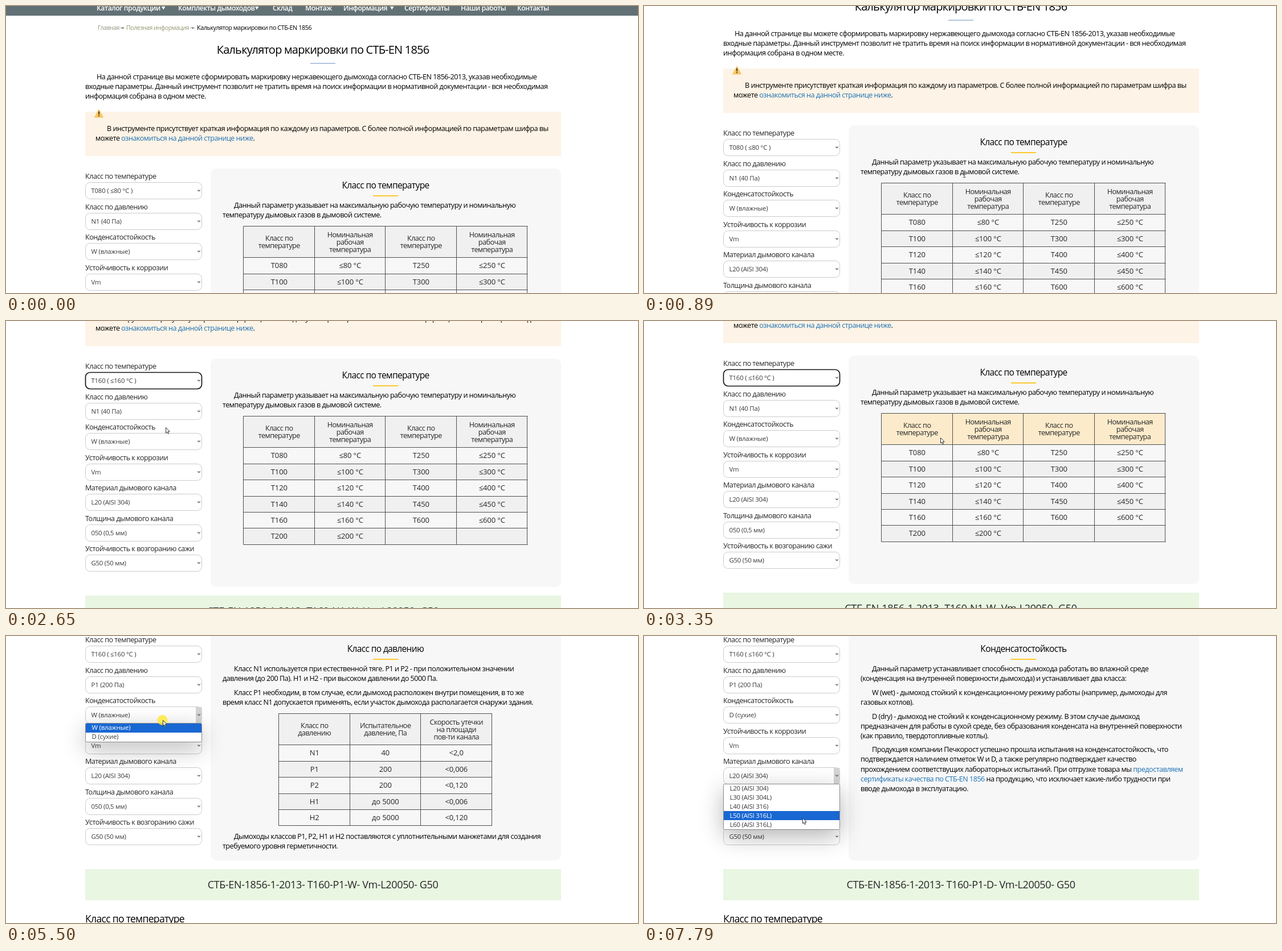
These frames come from a looping animation (1109x505 px, 7.99 s). An HTML page with a canvas:

```html
<!DOCTYPE html>
<html lang="ru">
<head>
<meta charset="utf-8">
<title>Калькулятор маркировки</title>
<style>
html, body { margin: 0; width: 100%; height: 100%; overflow: hidden; background: #fff; }
canvas { display: block; width: 1109px; height: 505px; }
</style>
</head>
<body>
<canvas id="stage"></canvas>
<script>
const W = 1109, H = 505, LOOP = 7990;
const canvas = document.getElementById('stage');
const ctx = canvas.getContext('2d');
const dpr = window.devicePixelRatio || 1;
canvas.width = W * dpr;
canvas.height = H * dpr;

const FONT = '"Open Sans", "Noto Sans", "DejaVu Sans", sans-serif';
const INK = '#000', SOFT = '#262626', LINK = '#1f72b4', YELLOW = '#fdc82f';

const clamp = v => Math.max(0, Math.min(1, v));
const easeInOut = p => p < 0.5 ? 4 * p ** 3 : 1 - 4 * (1 - p) ** 3;
const smooth = p => p * p * (3 - 2 * p);

// ---- timeline ----
const NOTCH = 73.2;
const NOTCHES = [[430, 200], [852, 180], [1030, 180], [3300, 190]];

// [time, x, y] of the pointer tip
const PATH = [
  [190, 640, 512], [540, 562, 296], [1090, 562, 296], [1230, 521, 258],
  [1500, 300, 130], [1620, 279, 103], [1830, 279, 103], [2050, 279, 187],
  [2640, 279, 187], [2860, 430, 198], [3070, 520, 205], [3450, 520, 205],
  [3900, 290, 92], [4030, 279, 85], [4080, 279, 85], [4180, 278, 122],
  [4800, 278, 122], [4900, 278, 133], [5300, 278, 133], [5450, 275, 148],
  [5510, 275, 148], [5640, 275, 173], [6640, 275, 173], [6980, 278, 239],
  [7180, 278, 239], [7700, 278, 320]
];

// Each use of a list: which one, when it opens, when an option is taken
const USES = [
  { box: 0, open: 1690, take: 2320, pick: 4 },
  { box: 1, open: 4030, take: 4350, pick: 1 },
  { box: 2, open: 5430, take: 5680, pick: 1 },
  { box: 4, open: 7120, take: Infinity, pick: 0 }
];

// [row, from, to]; row 0 is the table head
const HOVERS = [[3, 950, 1215], [2, 1150, 1340], [0, 2800, 3330], [2, 3400, 3560]];

// ---- content ----
const temps = [80, 100, 120, 140, 160, 200, 250, 300, 400, 450, 600];
const tName = n => 'T' + String(n).padStart(3, '0');
const tMax = n => `≤${n} °C`;

const BOXES = [
  ['Класс по температуре', temps.map(n => `${tName(n)} ( ${tMax(n)} )`)],
  ['Класс по давлению', ['N1 (40 Па)', 'P1 (200 Па)', 'P2 (200 Па)', 'H1 (200 и 5000 Па)', 'H2 (200 и 5000 Па)']],
  ['Конденсатостойкость', ['W (влажные)', 'D (сухие)']],
  ['Устойчивость к коррозии', ['Vm']],
  ['Материал дымового канала', ['L20 (AISI 304)', 'L30 (AISI 304L)', 'L40 (AISI 316)', 'L50 (AISI 316L)', 'L60 (AISI 316L)']],
  ['Толщина дымового канала', ['050 (0,5 мм)']],
  ['Устойчивость к возгоранию сажи', ['G50 (50 мм)']]
];

const NAV = [
  [159, 'Каталог продукции', 276], [302, 'Комплекты дымоходов', 440], [468, 'Склад'],
  [525, 'Монтаж'], [592, 'Информация', 677], [699, 'Сертификаты'],
  [798, 'Наши работы'], [897, 'Контакты']
];

const tempRows = [0, 1, 2, 3, 4, 5].map(i => {
  const cells = n => n ? [tName(n), tMax(n)] : ['', ''];
  return [...cells(temps[i]), ...cells(temps[i + 6])];
});
const T_HEAD = ['Класс по|температуре', 'Номинальная|рабочая|температура'];

const PANELS = [
  {
    title: 'Класс по температуре',
    paras: [[351, 'Данный параметр указывает на максимальную рабочую температуру и номинальную',
      'температуру дымовых газов в дымовой системе.']],
    table: { x: 417, y: 387.5, head: [...T_HEAD, ...T_HEAD], rows: tempRows }
  },
  {
    title: 'Класс по давлению',
    paras: [
      [351, 'Класс N1 используется при естественной тяге. P1 и P2 - при положительном значении',
        'давления (до 200 Па). H1 и H2 - при высоком давлении до 5000 Па.'],
      [393, 'Класс P1 необходим, в том случае, если дымоход расположен внутри помещения, в то же',
        'время класс N1 допускается применять, если участок дымохода располагается снаружи здания.'],
      [646, 'Дымоходы классов P1, P2, H1 и H2 поставляются с уплотнительными манжетами для создания',
        'требуемого уровня герметичности.']
    ],
    table: {
      x: 479, y: 429.5,
      head: ['Класс по|давлению', 'Испытательное|давление, Па', 'Скорость утечки|на площади|пов-ти канала'],
      rows: [['N1', '40', '<2,0'], ['P1', '200', '<0,006'], ['P2', '200', '<0,120'],
        ['H1', 'до 5000', '<0,006'], ['H2', 'до 5000', '<0,120']]
    }
  },
  {
    title: 'Конденсатостойкость',
    paras: [
      [351, 'Данный параметр устанавливает способность дымохода работать во влажной среде',
        '(конденсация на внутренней поверхности дымохода) и устанавливает два класса:'],
      [393, 'W (wet) - дымоход стойкий к конденсационному режиму работы (например, дымоходы для',
        'газовых котлов).'],
      [434.5, 'D (dry) - дымоход не стойкий к конденсационному режиму. В этом случае дымоход',
        'предназначен для работы в сухой среде, без образования конденсата на внутренней поверхности',
        '(как правило, твердотопливные котлы).'],
      [493, 'Продукция компании Печкорост успешно прошла испытания на конденсатостойкость, что',
        'подтверждается наличием отметок W и D, а также регулярно подтверждает качество',
        'прохождением соответствущих лабораторных испытаний. При отгрузке товара мы |предоставляем',
        '|сертификаты качества по СТБ-EN 1856| на продукцию, что исключает какие-либо трудности при',
        'вводе дымохода в эксплуатацию.']
    ]
  }
];

// ---- drawing helpers ----
function rect(x, y, w, h, color) {
  ctx.fillStyle = color;
  ctx.fillRect(x, y, w, h);
}

function roundRect(x, y, w, h, r, fill, stroke, line = 1) {
  ctx.beginPath();
  ctx.roundRect(x, y, w, h, r);
  if (fill) { ctx.fillStyle = fill; ctx.fill(); }
  if (stroke) { ctx.strokeStyle = stroke; ctx.lineWidth = line; ctx.stroke(); }
}

function poly(points, fill, stroke) {
  ctx.beginPath();
  points.forEach(([x, y]) => ctx.lineTo(x, y));
  ctx.closePath();
  ctx.fillStyle = fill;
  ctx.fill();
  if (stroke) { ctx.strokeStyle = stroke; ctx.lineWidth = 1; ctx.stroke(); }
}

// Text centred on y; parts between bars are links
function text(s, x, y, { size = 12.6, color = INK, align = 'left', track = -0.04, weight = 400 } = {}) {
  ctx.font = `${weight} ${size}px ${FONT}`;
  ctx.letterSpacing = `${track * size}px`;
  ctx.textAlign = align;
  s.split('|').forEach((part, i) => {
    ctx.fillStyle = i % 2 ? LINK : color;
    ctx.fillText(part, x, y + size * 0.345);
    x += ctx.measureText(part).width;
  });
}

function drawTable({ x, y, head, rows }, glow) {
  const colW = 124.5, headH = 55.3, rowH = 28.4;
  const w = colW * head.length, h = headH + rowH * rows.length;
  const top = i => i ? y + headH + (i - 1) * rowH : y;
  for (let i = 0; i <= rows.length; i++) {
    const rh = i ? rowH : headH;
    if (i % 2 === 0) rect(x, top(i), w, rh, '#f0f0f0');
    const a = glow(i);
    if (a > 0) rect(x, top(i), w, rh, `rgba(253,235,200,${a})`);
  }
  ctx.strokeStyle = '#505050';
  ctx.lineWidth = 1;
  ctx.beginPath();
  for (let i = 0; i <= rows.length + 1; i++) {
    const ly = Math.floor(top(i)) + 0.5;
    ctx.moveTo(x - 0.5, ly);
    ctx.lineTo(x + w + 0.5, ly);
  }
  for (let i = 0; i <= head.length; i++) {
    const lx = Math.floor(x + i * colW - 0.5) + 0.5;
    ctx.moveTo(lx, y);
    ctx.lineTo(lx, y + h);
  }
  ctx.stroke();
  head.forEach((cell, c) => {
    const lines = cell.split('|');
    lines.forEach((s, i) => text(s, x + (c + 0.5) * colW,
      y + 28 + (i - (lines.length - 1) / 2) * 13.3, { align: 'center', color: SOFT }));
  });
  rows.forEach((row, r) => row.forEach((s, c) => text(s, x + (c + 0.5) * colW,
    top(r + 1) + rowH / 2, { size: 13, track: -0.01, align: 'center', color: SOFT })));
}

// ---- page parts ----
function drawTop() {
  rect(0, 0, W, 17, '#627175');
  for (const [x, label, mark] of NAV) {
    text(label, x, 4, { size: 12.2, weight: 600, color: '#fff' });
    if (mark) poly([[mark - 3, 1], [mark + 3.5, 1], [mark + 0.2, 6.5]], '#fff');
  }
  const crumb = (s, x, color, size = 10.5) => text(s, x, 38.5, { size, color });
  crumb('Главная', 161, '#96987f');
  crumb('➛', 200, '#555');
  crumb('Полезная информация', 211, '#96986f');
  crumb('➛', 323, '#555');
  crumb('Калькулятор маркировки по СТБ-EN 1856', 335, INK, 10.8);

  text('Калькулятор маркировки по СТБ-EN 1856', 556, 77, { size: 20, align: 'center' });
  rect(534, 100, 44, 2, '#b3c6e0');
  text('На данной странице вы можете сформировать маркировку нержавеющего дымохода согласно СТБ-EN 1856-2013, указав необходимые', 159, 125);
  text('входные параметры. Данный инструмент позволит не тратить время на поиск информации в нормативной документации - вся необходимая', 139, 142);
  text('информация собрана в одном месте.', 139, 159);

  rect(139, 186, 835, 78, '#fdf3e6');
  poly([[163, 182], [170.5, 196], [155.5, 196]], '#fbc662', '#fbc662');
  rect(162.2, 185.5, 1.8, 5.5, '#3c3022');
  rect(162.2, 192.3, 1.8, 1.8, '#3c3022');
  text('В инструменте присутствует краткая информация по каждому из параметров. С более полной информацией по параметрам шифра вы', 177, 216);
  text('можете |ознакомиться на данной странице ниже|.', 157, 233);
}

const boxTop = i => Math.round(310 + 53.5 * i);
const LIST = { size: 11.4, track: -0.02 };

function drawBoxes(t, values) {
  const last = USES.filter(u => t >= u.open).pop();
  BOXES.forEach(([label, options], i) => {
    const y = boxTop(i), mine = last && last.box === i;
    const open = mine && t < last.take, ring = mine && !open;
    text(label, 139, y - 10.3, { color: SOFT });
    roundRect(139.5, y + 0.5, 204, 29, 8, '#fff', ring ? '#151515' : '#cbcbcb', ring ? 1.7 : 1);
    if (open) rect(333, y + 1, 10.5, 28, '#d4d4d4');
    text(options[values[i]], 149.5, y + 14.8, { ...LIST, color: '#3a3a3a' });
    ctx.strokeStyle = '#555';
    ctx.lineWidth = 1.1;
    ctx.beginPath();
    ctx.moveTo(336.3, y + 13.5);
    ctx.lineTo(338.5, y + 15.7);
    ctx.lineTo(340.7, y + 13.5);
    ctx.stroke();
  });
}

function drawList(t, values, pointerY) {
  const use = USES.find(u => t >= u.open && t < u.take);
  if (!use) return;
  const options = BOXES[use.box][1], step = 15.85;
  const y = boxTop(use.box) + 29, h = options.length * step + 1;
  const over = Math.floor((pointerY - y) / step);
  const active = over >= 0 && over < options.length ? over : values[use.box];
  ctx.save();
  ctx.shadowColor = 'rgba(0,0,0,.3)';
  ctx.shadowBlur = 40 * dpr;
  ctx.shadowOffsetY = 12 * dpr;
  roundRect(140, y, 203.5, h, 2, '#fff');
  ctx.restore();
  roundRect(139.5, y + 0.5, 204, Math.round(h), 2, '#fff', '#8a8a8a');
  options.forEach((s, i) => {
    const top = y + 0.5 + i * step;
    if (i === active) rect(140, Math.round(top), 203, 16, '#1967d2');
    text(s, 150.5, top + step / 2, { ...LIST, color: i === active ? '#fff' : '#3a3a3a' });
  });
}

function drawPanel(t) {
  roundRect(359, 286, 615, 402, 10, '#f7f7f7');
  let shown = 0, alpha = 1;
  USES.slice(1, 3).forEach(({ take }, i) => {
    const age = t - take;
    if (age < 0) return;
    if (age < 400) { shown = i; alpha = 1 - smooth(clamp(age / 380)); }
    else { shown = i + 1; alpha = smooth(clamp((age - 400) / 400)); }
  });
  const { title, paras, table } = PANELS[shown];
  const glow = row => shown ? 0 : Math.max(0, ...HOVERS.filter(h => h[0] === row)
    .map(([, a, b]) => clamp((t - a) / 250) * (1 - clamp((t - b) / 250))));
  ctx.save();
  ctx.globalAlpha = alpha;
  text(title, 666, 315.7, { size: 15.5, align: 'center' });
  rect(644, 333, 44, 2, YELLOW);
  for (const [y, ...lines] of paras)
    lines.forEach((s, i) => text(s, i ? 380 : 400, y + i * 17.1));
  if (table) drawTable(table, glow);
  ctx.restore();
}

function drawResult(values) {
  const code = i => BOXES[i][1][values[i]].split(' ')[0];
  rect(139, 703, 835, 55, '#e8f6e2');
  text(`СТБ-EN-1856-1-2013- ${code(0)}-${code(1)}-${code(2)}- Vm-L20050- G50`, 556, 731,
    { size: 18, track: -0.02, align: 'center', color: SOFT });
  text('Класс по температуре', 139, 791, { size: 17.6 });
}

// ---- pointer ----
function pointerAt(t) {
  const i = PATH.findIndex(k => k[0] > t);
  if (i < 0) return PATH[PATH.length - 1].slice(1);
  if (i === 0) return PATH[0].slice(1);
  const [t0, x0, y0] = PATH[i - 1], [t1, x1, y1] = PATH[i];
  const p = smooth((t - t0) / (t1 - t0));
  return [x0 + (x1 - x0) * p, y0 + (y1 - y0) * p];
}

function drawPointer(t, x, y) {
  const clicked = USES.some(u => [u.open, u.take].some(c => t >= c && t < c + 150));
  if (clicked) {
    ctx.fillStyle = 'rgba(255,232,50,.8)';
    ctx.beginPath();
    ctx.arc(x - 0.5, y, 9, 0, 7);
    ctx.fill();
  }
  if (t > 480 && t < 960) {
    rect(x - 2, y - 4, 4.5, 1, '#555');
    rect(x - 0.3, y - 4, 1, 10, '#555');
    rect(x - 2, y + 5, 4.5, 1, '#555');
    return;
  }
  const shape = [[0, 0], [0, 9.5], [2.1, 7.6], [3.6, 11], [5.2, 10.3], [3.8, 7], [6.6, 6.8]];
  poly(shape.map(([a, b]) => [x + a + 0.5, y + b + 0.5]), '#fff', '#333');
}

function draw(t) {
  const scroll = Math.round(NOTCH * NOTCHES.reduce(
    (sum, [start, span]) => sum + easeInOut(clamp((t - start) / span)), 0));
  const values = BOXES.map(() => 0);
  USES.forEach(u => { if (t >= u.take) values[u.box] = u.pick; });
  const [px, py] = pointerAt(t);

  ctx.setTransform(dpr, 0, 0, dpr, 0, 0);
  rect(0, 0, W, H, '#fff');
  ctx.translate(0, -scroll);
  drawTop();
  drawBoxes(t, values);
  drawPanel(t);
  drawResult(values);
  drawList(t, values, py + scroll);
  ctx.translate(0, scroll);
  if (t >= 190) drawPointer(t, px, py);
}

const begin = performance.now();
function frame() {
  draw((performance.now() - begin) % LOOP);
  requestAnimationFrame(frame);
}
frame();
</script>
</body>
</html>
```
